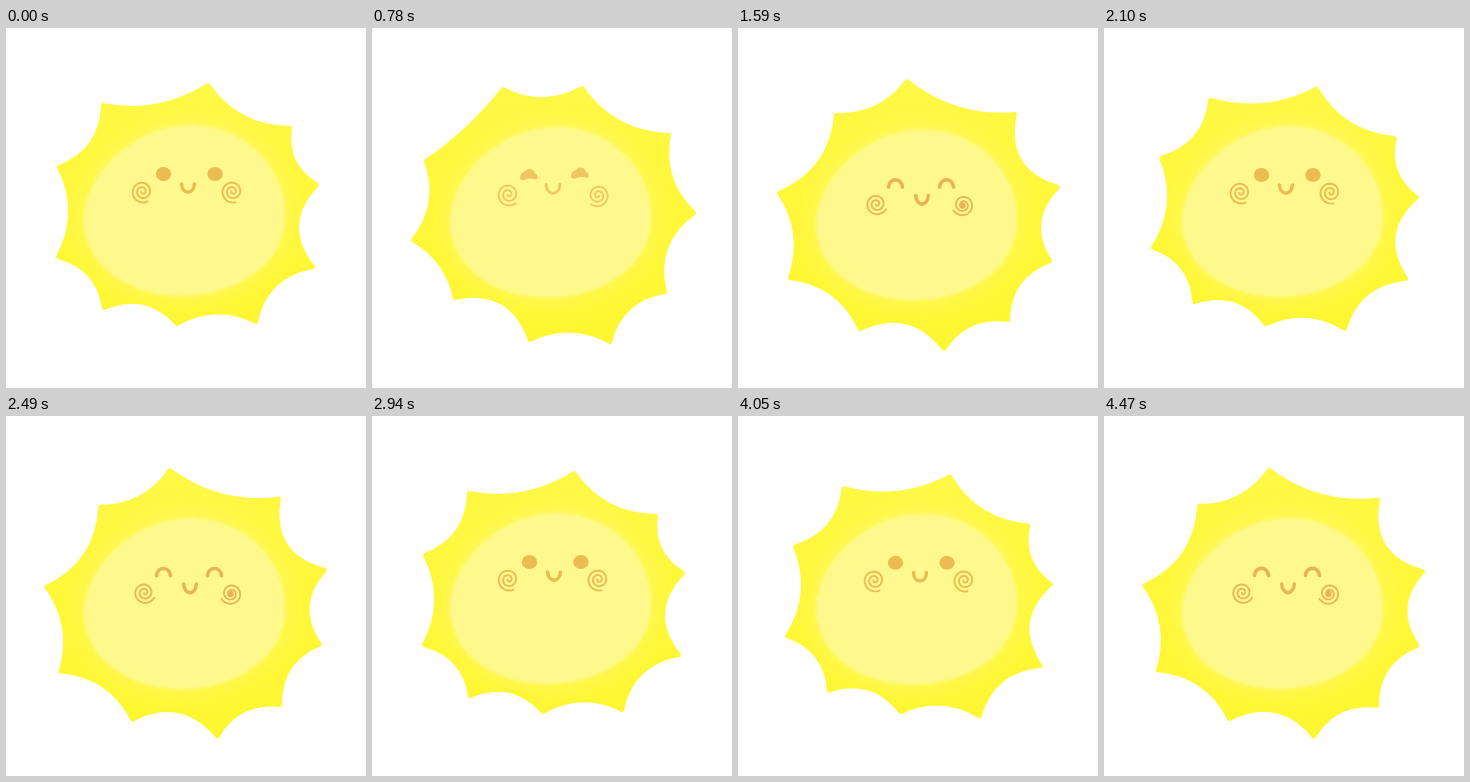
An HTML page with a canvas for the animation above (4.5 s loop, 360 px wide and 360 px high).

```html
<!DOCTYPE html>
<html lang="en">
<head>
<meta charset="utf-8">
<title>Sun</title>
<style>
html, body { margin: 0; width: 100%; height: 100%; overflow: hidden; background: #fff; }
canvas { display: block; width: 100vmin; height: 100vmin; }
</style>
</head>
<body>
<canvas width="360" height="360"></canvas>
<script>
const ctx = document.querySelector('canvas').getContext('2d');
const LOOP = 4500, STEP = 30, CYCLE = 980, TAU = Math.PI * 2;
const CENTER = [176, 186];

// Three drawings of the rays; each turns slowly while it is on screen.
// A tip is x, y and how deep the edge after it curves in.
const RAYS = {
  small: { at: 0, speed: 0.034, tips: [
    [97, 77, 0.2], [202, 57, 0.26], [284, 100, 0.33], [311, 157, 0.44], [307, 239, 0.34],
    [250, 294, 0.27], [171, 296, 0.36], [98, 280, 0.33], [52, 229, 0.26], [53, 139, 0.33]] },
  large: { at: 610, speed: 0.028, tips: [
    [98, 87, 0.26], [169, 53, 0.2], [277, 86, 0.46], [320, 159, 0.4], [312, 233, 0.34],
    [270, 292, 0.32], [206, 321, 0.4], [122, 301, 0.28], [52, 250, 0.25], [41, 165, 0.3]] },
  turned: { at: 780, speed: 0.034, tips: [
    [131, 61, 0.27], [210, 60, 0.25], [297, 107, 0.27], [322, 185, 0.34], [293, 264, 0.33],
    [238, 314, 0.26], [158, 312, 0.2], [83, 270, 0.42], [41, 212, 0.28], [54, 133, 0.08]] }
};
// The dip of an edge belongs to the tip it starts from, going clockwise.
RAYS.turned.tips[6][2] = 0.44;
RAYS.turned.tips[7][2] = 0.22;

const bob = phase => 2.6 * (1 - Math.cos(TAU * phase / CYCLE));

function raysAt(phase) {
  if (phase >= 855) return [RAYS.small, phase - CYCLE];
  if (phase >= 735) return [RAYS.turned, phase];
  if (phase >= 315) return [RAYS.large, phase];
  return [RAYS.small, phase];
}

function tracePetals(tips) {
  ctx.beginPath();
  ctx.moveTo(tips[0][0], tips[0][1]);
  tips.forEach(([x, y, dip], i) => {
    const [nx, ny] = tips[(i + 1) % tips.length];
    ctx.quadraticCurveTo((x + nx) / 2 - (ny - y) * dip, (y + ny) / 2 + (nx - x) * dip, nx, ny);
  });
  ctx.closePath();
}

function drawRays(phase) {
  const [drawing, time] = raysAt(phase);
  const angle = (time - drawing.at) * drawing.speed * Math.PI / 180;
  const c = Math.cos(angle), s = Math.sin(angle);
  const lift = bob(phase) - bob(drawing.at);
  const [cx, cy] = CENTER;
  tracePetals(drawing.tips.map(([x, y, dip]) => [
    cx + (x - cx) * c - (y - cy) * s,
    cy + (x - cx) * s + (y - cy) * c + lift,
    dip
  ]));
  const fill = ctx.createLinearGradient(0, 55, 0, 320);
  fill.addColorStop(0, '#fff846');
  fill.addColorStop(0.5, '#fff738');
  fill.addColorStop(1, '#fff632');
  ctx.fillStyle = ctx.strokeStyle = fill;
  ctx.lineWidth = 4;
  ctx.lineJoin = 'round';
  ctx.fill();
  ctx.stroke();
}

// An egg, flatter at the upper left, with a soft glow around it.
function drawBody(phase) {
  ctx.save();
  ctx.translate(0, bob(phase));
  ctx.beginPath();
  ctx.moveTo(78, 192);
  ctx.bezierCurveTo(78, 146, 128, 97, 185, 97);
  ctx.bezierCurveTo(237, 97, 279, 137, 279, 188);
  ctx.bezierCurveTo(279, 236, 230, 268, 175, 268);
  ctx.bezierCurveTo(121, 268, 78, 236, 78, 192);
  ctx.fillStyle = '#fff98d';
  ctx.shadowColor = 'rgba(255,249,120,.75)';
  ctx.shadowBlur = 26;
  ctx.filter = 'blur(1.5px)';
  ctx.fill();
  ctx.restore();
}

function spiral(x, y, size, end, mirror = 1) {
  ctx.beginPath();
  for (let i = 0; i <= 70; i++) {
    const k = i / 70, a = end + (1 - k) * 2.3 * TAU, r = 1 + (size - 1) * k;
    ctx.lineTo(x + mirror * r * Math.cos(a), y + r * Math.sin(a));
  }
  ctx.stroke();
}

function arch(x, y, halfWidth, height) {
  ctx.beginPath();
  ctx.moveTo(x - halfWidth, y);
  ctx.bezierCurveTo(x - halfWidth + 1, y + height, x + halfWidth - 1, y + height, x + halfWidth, y);
  ctx.stroke();
}

function halfEye(x, y) {
  ctx.beginPath();
  ctx.moveTo(x - 9, y + 3);
  ctx.bezierCurveTo(x - 9, y - 2, x - 6, y - 3, x - 4, y - 4);
  ctx.bezierCurveTo(x - 1, y - 8, x + 5, y - 7, x + 6, y - 2);
  ctx.bezierCurveTo(x + 10, y, x + 9, y + 5, x + 6, y + 4);
  ctx.quadraticCurveTo(x, y + 2, x - 4, y + 4.5);
  ctx.quadraticCurveTo(x - 8, y + 6, x - 9, y + 3);
  ctx.fill();
}

const FACES = {
  open: { color: '#ecbc54', rest: 0, draw() {
    for (const x of [157.5, 209]) {
      ctx.beginPath();
      ctx.ellipse(x, 146, 7.7, 7, 0, 0, TAU);
      ctx.fill();
    }
    ctx.lineWidth = 3.5;
    arch(182, 156, 6.5, 11);
    ctx.lineWidth = 1.9;
    spiral(136.5, 163.5, 11.3, 1.1);
    spiral(226.5, 163.5, 11.3, 1.3);
  } },
  half: { color: '#f2c562', rest: 3, draw() {
    halfEye(157, 148.5);
    halfEye(208, 147);
    ctx.lineWidth = 2.8;
    arch(181, 157.5, 7, 12);
    ctx.lineWidth = 1.8;
    spiral(136.5, 167.5, 11.6, 0.9);
    spiral(226, 168.5, 11.3, 0.9, -1);
  } },
  happy: { color: '#e9b459', rest: 5, draw() {
    ctx.lineWidth = 3.6;
    arch(157.5, 159.5, 7, -9.5);
    arch(208.5, 159.5, 7, -9.5);
    arch(184, 168, 6.3, 11.5);
    ctx.lineWidth = 1.8;
    spiral(138.5, 176.5, 11, 0.5);
    spiral(225, 177.5, 11, 0.5, -1);
    ctx.beginPath();
    ctx.arc(224.5, 178, 3.2, 0, TAU);
    ctx.fill();
  } }
};

function faceAt(phase) {
  if (phase < 168 || phase >= 903) return FACES.open;
  return phase >= 413 && phase < 658 ? FACES.happy : FACES.half;
}

function drawFace(phase) {
  const face = faceAt(phase);
  ctx.save();
  ctx.translate(0, bob(phase) - face.rest);
  ctx.fillStyle = ctx.strokeStyle = face.color;
  ctx.lineCap = 'round';
  face.draw();
  ctx.restore();
}

function frame() {
  const time = Math.floor(performance.now() % LOOP / STEP) * STEP;
  const phase = time % CYCLE;
  ctx.fillStyle = '#fff';
  ctx.fillRect(0, 0, 360, 360);
  drawRays(phase);
  ctx.save();
  ctx.clip();
  drawBody(phase);
  ctx.restore();
  drawFace(phase);
  requestAnimationFrame(frame);
}
frame();
</script>
</body>
</html>
```
